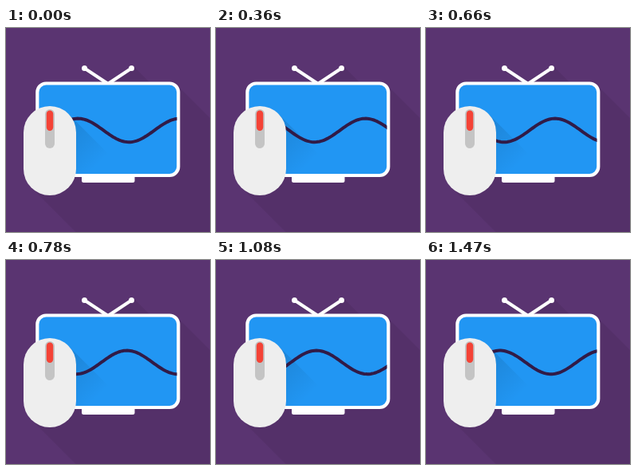
Animation of 256 by 256 pixels, one loop 1.5 s. Source, as an HTML page:

```html
<!DOCTYPE html>
<html>
<head>
<meta charset="utf-8">
<style>
  html, body { margin: 0; height: 100%; overflow: hidden; background: #5a3471; }
  svg { display: block; width: 100vw; height: 100vh; }
</style>
</head>
<body>
<svg viewBox="0 0 256 256">
  <defs>
    <linearGradient id="mouseFade" gradientUnits="userSpaceOnUse" x1="55" y1="154" x2="94" y2="193">
      <stop offset="0" stop-opacity=".1"/>
      <stop offset="1" stop-opacity="0"/>
    </linearGradient>
    <clipPath id="screen"><rect x="41.5" y="71.5" width="173" height="111.5" rx="9"/></clipPath>
  </defs>

  <rect width="256" height="256" fill="#5a3471"/>
  <!-- long shadows: antennas, then television and mouse together -->
  <g opacity=".06">
    <path d="M101 48L123 70L96 53ZM160 48L182 70H125Z"/>
    <path d="M214.2 71.2L256 113V256H87.4L31.7 200.3Z"/>
  </g>

  <path d="M98.5 50.5L131 72M157.5 50.5L125 72" stroke="#fff" stroke-width="4"/>
  <g fill="#fff">
    <circle cx="98.5" cy="50.5" r="3.5"/>
    <circle cx="157.5" cy="50.5" r="3.5"/>
    <path d="M95 187H161.5V191.5Q161.5 194 159 194H97.5Q95 194 95 191.5Z"/>
  </g>
  <rect x="39.3" y="69.5" width="177" height="115.5" rx="11" fill="#2196f3" stroke="#fff" stroke-width="4.2"/>

  <g clip-path="url(#screen)">
    <path d="M78.3 107.7L226.6 256H87.4L31.7 200.3Z" fill="url(#mouseFade)"/>
    <path id="wave" fill="none" stroke="#311b47" stroke-width="4"/>
  </g>

  <rect x="22" y="98" width="66" height="112" rx="33" fill="#eee"/>
  <rect x="49" y="102" width="12" height="49" rx="6" fill="#c4c4c4"/>
  <rect x="50.8" y="103.5" width="8.4" height="25.5" rx="4.2" fill="#f44336"/>
</svg>
<script>
  const LOOP = 1500, STEP = 30, WAVELENGTH = 128;
  const wave = document.getElementById('wave');

  function draw(now) {
    const time = Math.floor((now % LOOP) / STEP) * STEP;
    const trough = 154.3 - WAVELENGTH * time / LOOP;
    const points = [];
    for (let x = 60; x <= 220; x += 2) {
      const y = 128.4 + 14.8 * Math.cos((x - trough) / WAVELENGTH * 2 * Math.PI);
      points.push(x + ' ' + y.toFixed(2));
    }
    wave.setAttribute('d', 'M' + points.join('L'));
  }

  const start = performance.now();
  function tick() {
    draw(performance.now() - start);
    requestAnimationFrame(tick);
  }
  tick();
</script>
</body>
</html>
```
